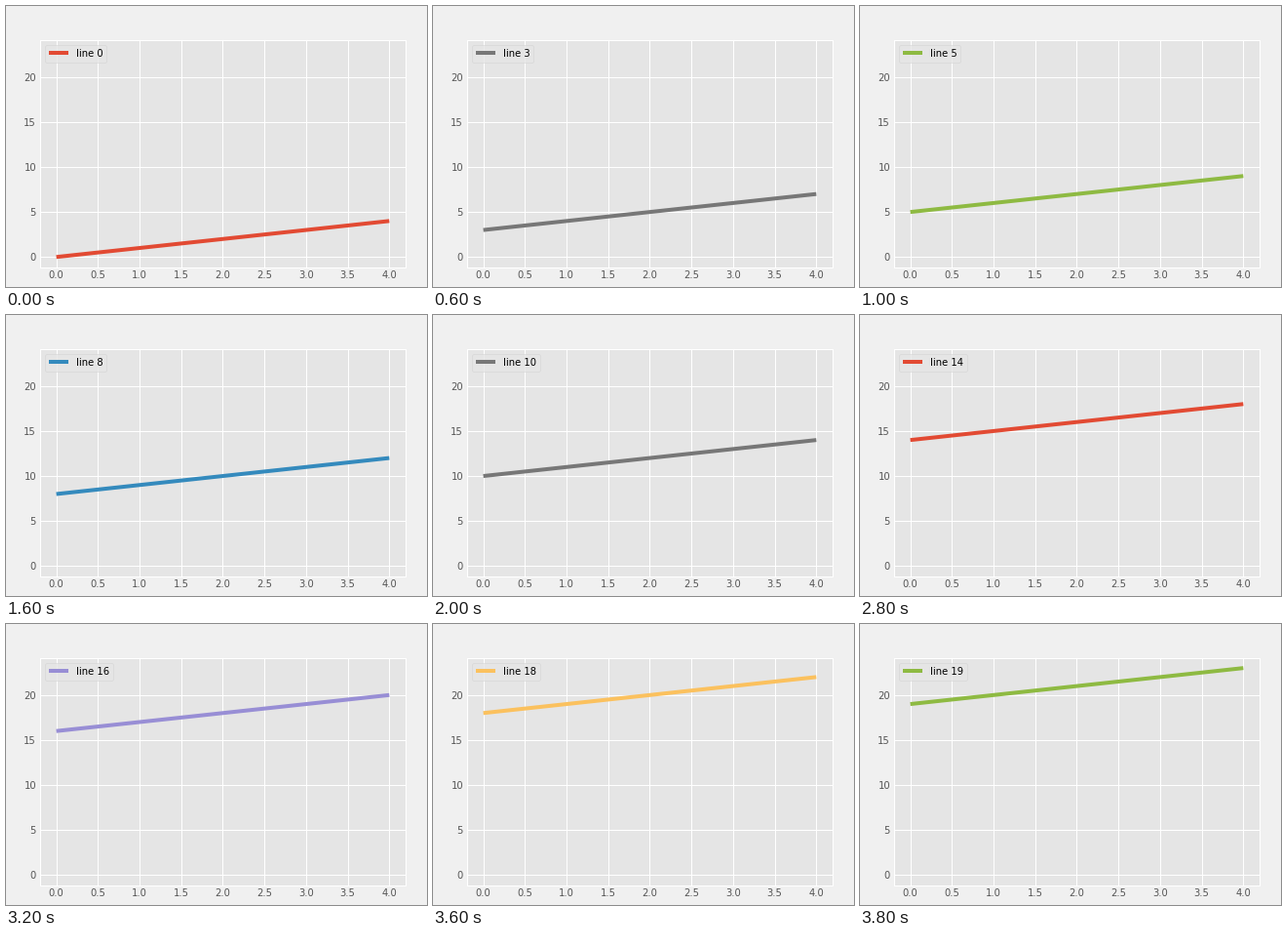
A matplotlib script that plays this animation: 432 px wide and 288 px high, repeating every 4 s.

```python
import numpy as np
import matplotlib.pyplot as plt
from matplotlib.animation import FuncAnimation

FRAMES, INTERVAL = 20, 200
COLORS = ["#E24A33", "#348ABD", "#988ED5", "#777777",
          "#FBC15E", "#8EBA42", "#FFB5B8"]

plt.rcParams.update({
    "font.family": "DejaVu Sans",
    "font.size": 10,
    "figure.facecolor": "#F0F0F0",
    "savefig.facecolor": "#F0F0F0",
    "axes.facecolor": "#E5E5E5",
    "axes.edgecolor": "white",
    "axes.linewidth": 1,
    "axes.grid": True,
    "axes.axisbelow": True,
    "grid.color": "white",
    "grid.linestyle": "-",
    "grid.linewidth": 1,
    "xtick.color": "#555555",
    "ytick.color": "#555555",
    "xtick.major.size": 0,
    "ytick.major.size": 0,
    "lines.linewidth": 4,
    "lines.solid_capstyle": "butt",
    "patch.linewidth": 0.5,
})

fig, ax = plt.subplots(figsize=(6, 4), dpi=72)
fig.subplots_adjust(left=0.08, right=0.95, bottom=0.07, top=0.88)
ax.set_xlim(-0.2, 4.2)
ax.set_ylim(-1.15, 24.15)
ax.set_xticks(np.arange(0, 4.5, 0.5))
ax.set_yticks(range(0, 25, 5))

x = np.arange(5)
line, = ax.plot(x, x)


def update(i):
    line.set_ydata(x + i)
    line.set_color(COLORS[i % len(COLORS)])
    line.set_label(f"line {i}")
    return line, ax.legend(loc="upper left")


anim = FuncAnimation(fig, update, frames=FRAMES, interval=INTERVAL,
                     repeat=True, repeat_delay=0, blit=False)
plt.show()
```
